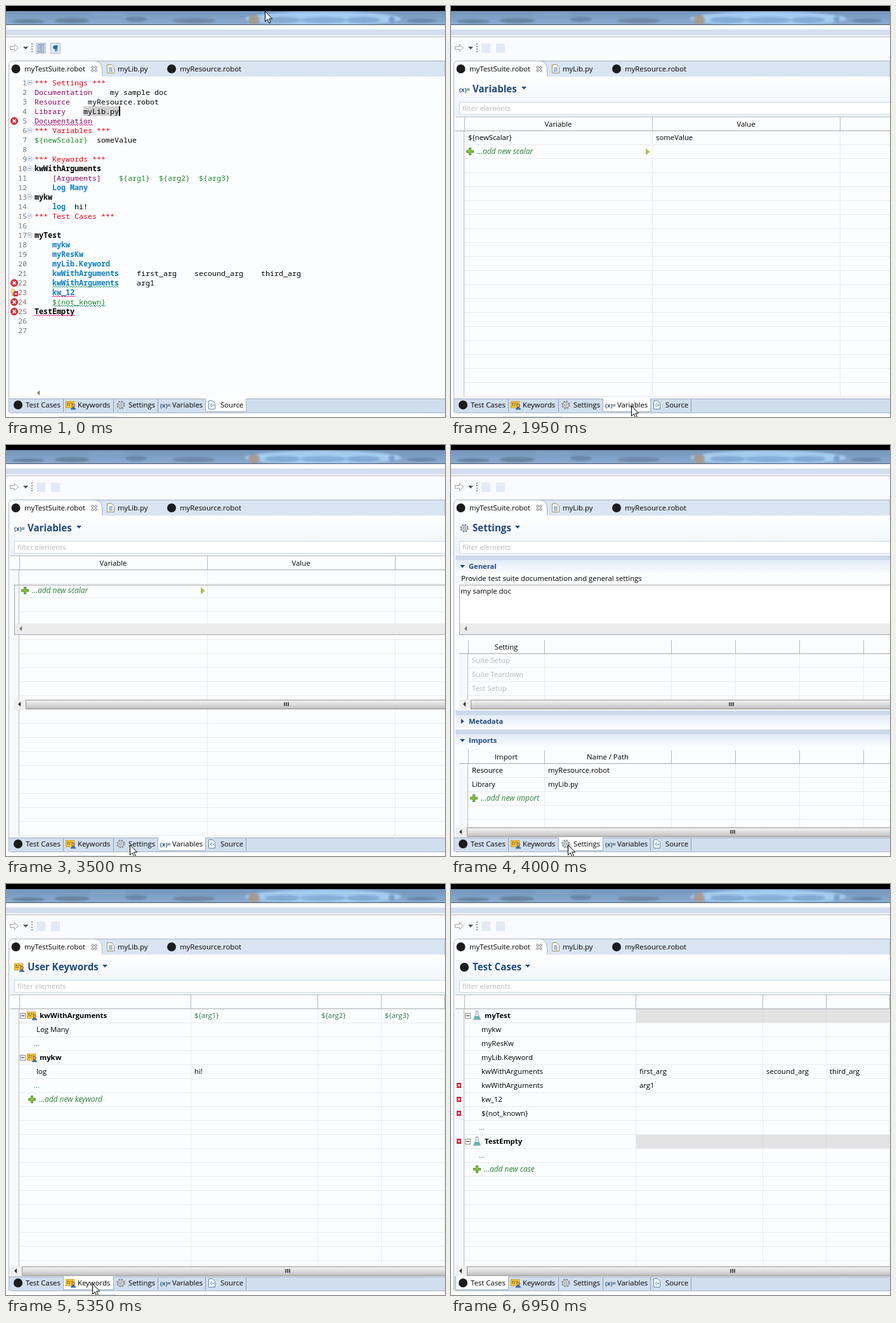
Recreate the animation shown at these times as an HTML page. Size 692 by 647 pixels, loop 7.9 s.

```html
<!DOCTYPE html>
<html lang="en">
<head>
<meta charset="utf-8">
<title>Robot editor pages</title>
<style>
html, body { margin: 0; width: 100%; height: 100%; overflow: hidden; background: #fff; }
svg { display: block; width: 692px; height: 647px; }
text { font: 11.35px "Open Sans", "Noto Sans", sans-serif; fill: #000; white-space: pre; }
.code { font: 11.66px "Noto Sans Mono", "DejaVu Sans Mono", monospace; }
.b { font-weight: 700; }
.num { fill: #787878; text-anchor: end; }
.red { fill: #f00012; }
.set { fill: #8c0a64; }
.var { fill: #1e8c28; }
.call { fill: #0d7fc4; font-weight: 700; }
.def { font-weight: 700; }
.title { font-size: 15.1px; font-weight: 700; fill: #1f4a80; }
.sec { font-weight: 700; fill: #1f4a80; font-size: 11.2px; }
.mid { text-anchor: middle; }
.pale { fill: #b9b9b9; }
.add { fill: #2a8238; font-style: italic; font-size: 11.9px; }
.arg { fill: #2a7a4c; }
</style>
</head>
<body>
<svg id="stage" viewBox="0 0 692 647">
<defs>
  <linearGradient id="sky" x2="0" y2="1"><stop stop-color="#7495ba"/><stop offset="1" stop-color="#8babd0"/></linearGradient>
  <linearGradient id="bar" x2="0" y2="1"><stop stop-color="#d9e5f2"/><stop offset="1" stop-color="#cadbec"/></linearGradient>
  <linearGradient id="head" x2="0" y2="1"><stop stop-color="#fff"/><stop offset="1" stop-color="#e9f0f8"/></linearGradient>
  <linearGradient id="sect" x2="0" y2="1"><stop stop-color="#e2ebf6"/><stop offset="1" stop-color="#fcfdfe"/></linearGradient>
  <linearGradient id="thumb" x2="0" y2="1"><stop stop-color="#f4f4f4"/><stop offset=".5" stop-color="#dcdcdc"/><stop offset="1" stop-color="#bdbdbd"/></linearGradient>
  <filter id="soft" x="-20%" y="-60%" width="140%" height="220%"><feGaussianBlur stdDeviation="1.8"/></filter>
  <clipPath id="strip"><rect y="8" width="692" height="21"/></clipPath>
</defs>
</svg>
<script>
const LOOP = 7900, W = 692;
const stage = document.getElementById('stage');

const rect = (x, y, w, h, fill, stroke) =>
  `<rect x="${x}" y="${y}" width="${w}" height="${h}" fill="${fill}"${stroke ? ` stroke="${stroke}"` : ''}/>`;
const box = (x, y, w, h, fill, stroke) => rect(x + .5, y + .5, w - 1, h - 1, fill, stroke);
const path = (d, fill, stroke = 'none', w = 1) => `<path d="${d}" fill="${fill}" stroke="${stroke}" stroke-width="${w}"/>`;
const hline = (y, x = 7, c = '#e8ebef', to = W) => rect(x, y, to - x, 1, c);
const vline = (x, y, to, c = '#e8ebef') => rect(x, y, 1, to - y, c);
const dot = (x, y, r, fill, stroke = 'none') => `<circle cx="${x}" cy="${y}" r="${r}" fill="${fill}" stroke="${stroke}"/>`;
const text = (x, y, s, cls = '') => `<text x="${x}" y="${y}" class="${cls}">${s}</text>`;
const group = (id, s) => `<g id="${id}">${s}</g>`;
const range = (from, to, step, fn) => {
  let s = '';
  for (let v = from; v < to; v += step) s += fn(v);
  return s;
};

// icons, placed by their centre
const mark = (x, y) => dot(x, y, 7, '#1c1c1c');
const down = (x, y, c = '#1f4a80') => path(`M${x - 4} ${y - 2}h8l-4 4.5z`, c);
const left = (x, y, c = '#333') => path(`M${x + 2} ${y - 4}v8l-4 -4z`, c);
const cross = (x, y, r, c, w) => path(`M${x - r} ${y - r}L${x + r} ${y + r}M${x + r} ${y - r}L${x - r} ${y + r}`, 'none', c, w);
const error = (x, y) => dot(x, y, 5.5, '#d8373b', '#b8282e') + cross(x, y, 2.3, '#fff', 1.7);
const badge = (x, y) => rect(x - 3.5, y - 4, 7, 8, '#d5202f') + cross(x, y, 1.7, '#fff', 1.2);
const plus = (x, y) => path(`M${x - 1.5} ${y - 5.5}h3v4h4v3h-4v4h-3v-4h-4v-3h4z`, '#8cc63f', '#4d8c2a');
const page = (x, y) => path(`M${x - 5.5} ${y - 6.5}h7l4 4v9h-11z`, '#fffdf0', '#9a8f63') +
  [-2, 0, 2, 4].map(d => rect(x - 3, y + d - .5, 6, 1, '#5d86bf')).join('');
const source = (x, y) => path(`M${x - 4.5} ${y - 6.5}h6l4 4v9h-10z`, '#fff', '#5f87b5') +
  path(`M${x + 1} ${y - 2}l-3 2.5l3 2.5M${x + 1} ${y + .5}h3`, 'none', '#2f77b8');
const keys = (x, y) => box(x - 8, y - 6, 14, 11, '#f7cc45', '#d29a22') +
  path(`M${x - 6} ${y - 2.5}h3m1 0h2m1 0h2M${x - 6} ${y + .5}h2m1 0h2`, 'none', '#8a5a12', 1.4) +
  dot(x + 4, y + 1, 2.3, '#f0b583', '#7a4a20') + path(`M${x} ${y + 7}q4 -7 8 0z`, '#3f73b5', '#2a4f86', .7);
const gear = (x, y) => `<circle cx="${x}" cy="${y}" r="5.6" fill="none" stroke="#8c929a" stroke-width="2.4" stroke-dasharray="2.4 2"/>` +
  dot(x, y, 4.7, '#d5d9de', '#858b93') + dot(x, y, 1.7, '#f4f6f8', '#858b93');
const vars = (x, y) => `<text x="${x - 8}" y="${y + 3.5}" style="font-size:9.2px;font-weight:700;fill:#2f5573">(x)=</text>`;
const flask = (x, y) => path(`M${x - 2} ${y - 7}h4M${x - 1.5} ${y - 7}v5l-4 8.5h11l-4 -8.5v-5`, '#f2f8fa', '#8aa0ab') +
  path(`M${x - 3} ${y + 1}h6l2 4.8h-10z`, '#4fb8ad');
const tree = y => box(22, y - 4, 9, 9, '#fff', '#8a8a8a') + rect(24, y, 5, 1, '#222');

function chrome() {
  const blob = ([x, y, rx, ry, c]) => `<ellipse cx="${x}" cy="${y}" rx="${rx}" ry="${ry}" fill="${c}"/>`;
  const blobs = [
    [35, 24, 26, 3, '#64829f'], [104, 23, 28, 4, '#66849f'], [205, 21, 17, 4, '#6886a8'], [296, 23, 34, 4, '#6f87a5'],
    [160, 13, 30, 2, '#86a6c8'], [500, 20, 123, 11, '#a4cbf0'], [391, 22, 9, 8, '#a59b93'],
    [436, 22, 28, 5, '#82aad4'], [500, 22, 36, 5, '#86aed8'], [563, 22, 27, 5, '#82aad4'],
    [608, 21, 5, 5, '#789fca'], [655, 23, 24, 3, '#6886a8']
  ];
  return rect(0, 0, W, 647, '#fff') + rect(0, 0, W, 8, '#000') + rect(0, 8, W, 21, 'url(#sky)') +
    `<g clip-path="url(#strip)"><g filter="url(#soft)">${blobs.map(blob).join('')}</g></g>` +
    hline(29, 0, '#4a5a6c') + rect(0, 37, W, 9, '#d3dfef') + rect(0, 46, W, 2, '#f6f9fd') +
    hline(48, 0, '#b3b9c2') + rect(0, 49, W, 37, '#fafbfe') +
    path('M6.5 63.5h7v-3l6 5.5l-6 5.5v-3h-7z', '#f7f7f7', '#a2a2a2') + down(31, 66, '#555') +
    range(59, 75, 4, y => rect(40, y, 2, 2, '#8d939b')) +
    path('M4.5 640V93q0 -6.5 7 -6.5H692V640.5H9q-4.5 0 -4.5 -4z', 'url(#bar)', '#a5b3c6') +
    rect(5, 111, W, 507, '#fcfdfe') +
    path('M5 111V93q0 -6 6 -6H139q10 0 12 9l1.500 15z', '#fdfeff') + path('M139 86.500q10 0 12 9l1 15.500', 'none', '#a5b3c6') +
    mark(15.500, 99) + mark(261, 99) + page(165, 99) +
    text(29, 103, 'myTestSuite.robot') + text(176, 103, 'myLib.py') + text(274, 103, 'myResource.robot') +
    cross(139, 99, 4, '#777', 3.400) + cross(139, 99, 3.700, '#fff', 1.500) +
    rect(5, 618, W, 22, '#d0deee') + hline(618, 5, '#9eacbe') + rect(82, 646, 92, 1, '#d5e3f2');
}

function tools() {
  const pressed = x => box(x, 58, 16, 17, '#dce9f7', '#a9c0da');
  return group('toolsOff', rect(48, 59, 14, 15, '#e4eaf5') + rect(71, 59, 14, 15, '#e4eaf5')) +
    group('toolsOn', pressed(47) + pressed(70) + box(50, 60, 10, 13, '#fff', '#64748a') +
      range(62, 71, 2, y => rect(52, y, 6, 1, '#3c6fae')) +
      path('M82 62.500h-5a2.500 2.500 0 0 0 0 5h1v4M78.500 62v9.500M80.500 62v9.500', '#2f66a8', '#2f66a8'));
}

const TABS = [[7, 84, 'Test Cases', 31, mark, 19], [90, 80, 'Keywords', 113, keys, 102],
  [169, 71, 'Settings', 193, gear, 181], [239, 76, 'Variables', 262, vars, 251], [314, 65, 'Source', 338, source, 324]];

const tabs = () => TABS.map(([x, w, name, tx, icon, ix], i) =>
  vline(x + w - 1, 619, 639, '#8f9db0') +
  group('tab' + i, box(x, 618, w, 21, '#fff', '#a3b0c2') + rect(x + 1, 617, w - 2, 2, '#fff')) +
  icon(ix, 628) + text(tx, 632, name)).join('');

// tokens: column, class, text
const LINES = [
  [[0, 'red', '*** Settings ***']],
  [[0, 'set', 'Documentation'], [17, '', 'my sample doc']],
  [[0, 'set', 'Resource'], [12, '', 'myResource.robot']],
  [[0, 'set', 'Library'], [11, '', 'myLib.py']],
  [[0, 'set', 'Documentation']],
  [[0, 'red', '*** Variables ***']],
  [[0, 'var', '${newScalar}'], [14, '', 'someValue']],
  [],
  [[0, 'red', '*** Keywords ***']],
  [[0, 'def', 'kwWithArguments']],
  [[4, 'set', '[Arguments]'], [19, 'var', '${arg1}'], [28, 'var', '${arg2}'], [37, 'var', '${arg3}']],
  [[4, 'call', 'Log Many']],
  [[0, 'def', 'mykw']],
  [[4, 'call', 'log'], [9, '', 'hi!']],
  [[0, 'red', '*** Test Cases ***']],
  [],
  [[0, 'def', 'myTest']],
  [[4, 'call', 'mykw']],
  [[4, 'call', 'myResKw']],
  [[4, 'call', 'myLib.Keyword']],
  [[4, 'call', 'kwWithArguments'], [23, '', 'first_arg'], [36, '', 'secound_arg'], [51, '', 'third_arg']],
  [[4, 'call', 'kwWithArguments'], [23, '', 'arg1']],
  [[4, 'call', 'kw_12']],
  [[4, 'var', '${not_known}']],
  [[0, 'def', 'TestEmpty']],
  [], []
];

function squiggle(line, col, len, c) {
  const x = 45 + col * 7, y = 172 + (line - 4) * 15;
  return path(`M${x} ${y + 1}` + 'l2 -2l2 2'.repeat(Math.round(len * 7 / 4)), 'none', c);
}

function code() {
  const rowY = n => 106 + n * 15;
  const lines = LINES.map((tokens, i) => text(33, rowY(i + 1) + 4, i + 1, 'code num') +
    tokens.map(([col, cls, s]) => text(45 + col * 7, rowY(i + 1) + 4, s, 'code ' + cls)).join('')).join('');
  const folds = [1, 6, 9, 10, 13, 15, 17].map(n =>
    dot(37.5, rowY(n) - .5, 3.8, '#f3f7fb', '#b3c3d6') + rect(35.5, rowY(n) - 1, 4, 1, '#6b88ab')).join('');
  const pink = '#e2188f', teal = '#2f9a86';
  return rect(6, 112, W, 506, '#fcfdfe') + rect(122, 158, 56, 15, '#d0d0d0') + folds + lines +
    squiggle(5, 0, 13, pink) + squiggle(22, 4, 15, teal) + squiggle(23, 4, 5, pink) +
    squiggle(24, 4, 12, teal) + squiggle(25, 0, 9, pink) +
    [5, 22, 24, 25].map(n => error(13, rowY(n))).join('') +
    dot(11, 449, 3.3, '#fff3b0', '#c79b34') + rect(9.5, 453, 3, 3, '#9b8a56') + badge(15.5, 453) +
    left(51, 609, '#777') + group('caret', rect(178, 158, 2, 15, '#000'));
}

const title = (id, icon, name, arrow) => group('title-' + id, icon(21, 131) + text(34, 136, name, 'title') + down(arrow, 129));

const header = () => rect(6, 112, W, 63, 'url(#head)') + box(13, 151, W, 20, '#fff', '#cbd7e5') +
  text(18, 165, 'filter elements', 'pale') + rect(6, 171, W, 4, '#f2f6fb');

const scroll = (y, x, grip) => rect(x - 8, y, W, 16, '#eeeeee') + left(x, y + 7) +
  box(x + 10, y, W, 15, 'url(#thumb)', '#959595') + [0, 3, 6].map(d => rect(grip + d, y + 4, 2, 6, '#555')).join('');

function table(top, cols, rows, bottom) {
  const [x0, x1] = cols, body = top + 21, head = '#b4b9c0';
  return rect(x0, top, W, bottom - top, '#fcfdfe') +
    range(body + 22, bottom, 22, y => hline(y, x1)) +
    cols.slice(2).map(x => vline(x, body, bottom)).join('') +
    rect(x0, body, x1 - x0 - 1, bottom - body, '#f6f8fb') + vline(x1 - 1, body, bottom, '#b5bac1') +
    cols.slice(1).map(x => vline(x, top, body, head)).join('') + hline(body, x0, '#a5a9af') + rows;
}

const cell = (x, y, s, cls) => text(x, y + 4, s, cls);
const more = (x, y, s) => plus(x, y) + text(x + 11, y + 4, '...add new ' + s, 'add');
const caption = (x, y, s) => text(x, y, s, 'mid');

function variables(partial) {
  const first = partial ? '' : cell(27, 207, '${newScalar}') + cell(323, 207, 'someValue');
  const overlay = partial ? box(13, 220, W, 79, 'none', '#a5a5a5') + rect(14, 281, W, 17, '#ececec') +
    left(23, 289, '#777') + scroll(401, 21, 438) : '';
  return hline(174, 7, '#b4b9c0') + table(175, [7, 21, 317, 613], first + caption(169, 190, 'Variable') + caption(465, 190, 'Value') +
    more(30, 229, 'scalar') + path('M307 224v11l6.500 -5.500z', '#a9c24b'), 615) + overlay;
}

function settings() {
  const cols = [13, 27, 147, 347, 448, 549, 650];
  const section = (y, name, open) => rect(7, y - 1, W, 7, '#cbd9ea') + rect(7, y + 6, W, 22, 'url(#sect)') +
    (open ? down(18, y + 16) : path(`M16 ${y + 12}v8l4.500 -4z`, '#1f4a80')) + text(28, y + 20, name, 'sec');
  const upper = ['Suite Setup', 'Suite Teardown', 'Test Setup'].map((s, i) => cell(33, 339 + i * 22, s, 'pale')).join('');
  const lower = caption(87, 495, 'Import') + caption(247, 495, 'Name / Path') +
    cell(33, 512, 'Resource') + cell(153, 512, 'myResource.robot') +
    cell(33, 534, 'Library') + cell(153, 534, 'myLib.py') + more(36, 556, 'import');
  return rect(6, 175, W, 443, '#fcfdfe') + section(175, 'General', true) +
    text(16, 214, 'Provide test suite documentation and general settings') +
    box(13, 220, W, 79, '#fff', '#a5a5a5') + rect(14, 281, W, 17, '#ececec') + left(23, 289, '#777') +
    text(15, 234, 'my sample doc') +
    table(307, cols, caption(87, 322, 'Setting') + upper, 401) + scroll(401, 21, 438) +
    section(419, 'Metadata', false) + section(449, 'Imports', true) +
    table(480, cols, lower, 602) + scroll(602, 15, 440);
}

const COLS = [7, 21, 291, 491, 591, 691];
const rowAt = i => 207 + i * 22;
const grid = rows => hline(174, 7, '#b4b9c0') + table(175, COLS, rows, 602) + scroll(602, 15, 440);
const parent = (i, icon, name) => tree(rowAt(i)) + icon(41, rowAt(i)) + cell(53, rowAt(i), name, 'b');
const dots = i => text(44, rowAt(i) + 4, '...', 'arg');

const keywords = () => grid(
  parent(0, keys, 'kwWithArguments') + [297, 497, 597].map((x, i) => cell(x, 207, '${arg' + (i + 1) + '}', 'arg')).join('') +
  cell(48, rowAt(1), 'Log Many') + dots(2) + parent(3, keys, 'mykw') +
  cell(48, rowAt(4), 'log') + cell(297, rowAt(4), 'hi!') + dots(5) + more(41, rowAt(6), 'keyword'));

function cases() {
  const shade = [0, 9].map(i => rect(292, rowAt(i) - 10, 399, 21, '#e3e3e3') +
    [491, 591].map(x => vline(x, rowAt(i) - 10, rowAt(i) + 11, '#d8dadc')).join('')).join('');
  const calls = ['mykw', 'myResKw', 'myLib.Keyword', 'kwWithArguments', 'kwWithArguments', 'kw_12', '${not_known}'];
  return grid(shade + parent(0, flask, 'myTest') + calls.map((s, i) => cell(48, rowAt(i + 1), s)).join('') +
    cell(297, rowAt(4), 'first_arg') + cell(497, rowAt(4), 'secound_arg') + cell(597, rowAt(4), 'third_arg') +
    cell(297, rowAt(5), 'arg1') + [5, 6, 7, 9].map(i => badge(12.5, rowAt(i))).join('') +
    dots(8) + parent(9, flask, 'TestEmpty') + dots(10) + more(41, rowAt(11), 'case'));
}

stage.insertAdjacentHTML('beforeend', chrome() + tools() + group('header', header()) +
  title('vars', vars, 'Variables', 115) + title('set', gear, 'Settings', 105) +
  title('keys', keys, 'User Keywords', 156) + title('cases', mark, 'Test Cases', 121) +
  group('body-code', code()) + group('body-vars', variables(false)) + group('body-part', variables(true)) +
  group('body-set', settings()) + group('body-keys', keywords()) + group('body-cases', cases()) +
  tabs() + group('cursor', path('M.5 .5v16l3.700 -3.500l2.600 6l2.500 -1.100l-2.600 -5.900h5z', '#fff', '#000')));

// time, body, title, selected tab
const PAGES = [[0, 'code', '', 4], [1950, 'vars', 'vars', 3], [3500, 'part', 'vars', 3], [3650, 'set', 'set', 2],
  [5150, 'set', 'keys', 1], [5350, 'keys', 'keys', 1], [6800, 'keys', 'cases', 0], [6950, 'cases', 'cases', 0]];
// time, x, y of the pointer; screen capture makes it jump
const MOVES = [[0, 408, 8], [200, 408, 38], [350, 409, 104], [500, 408, 190], [650, 399, 318], [850, 354, 478],
  [1000, 314, 580], [1150, 292, 625], [1300, 288, 627], [1450, 284, 629],
  [2100, 274, 629], [2250, 247, 629], [2450, 211, 629], [2600, 195, 629],
  [3950, 184, 629], [4150, 153, 629], [4300, 136, 629],
  [5500, 117, 630], [5700, 71, 631], [5850, 45, 632]];

const $ = id => document.getElementById(id);
const show = (id, on) => { $(id).style.display = on ? '' : 'none'; };
const at = (list, t) => list.filter(e => e[0] <= t).pop();

function update(t) {
  const [, body, head, tab] = at(PAGES, t), [, x, y] = at(MOVES, t);
  for (const id of ['code', 'vars', 'part', 'set', 'keys', 'cases']) show('body-' + id, id === body);
  for (const id of ['vars', 'set', 'keys', 'cases']) show('title-' + id, id === head);
  TABS.forEach((_, i) => show('tab' + i, i === tab));
  show('header', head);
  show('toolsOn', !head);
  show('toolsOff', head);
  show('caret', t < 500 || (t >= 1000 && t < 1450));
  show('cursor', t < 6950);
  $('cursor').setAttribute('transform', `translate(${x} ${y})`);
}

const start = performance.now();
function tick() {
  update((performance.now() - start) % LOOP);
  requestAnimationFrame(tick);
}
tick();
</script>
</body>
</html>
```
